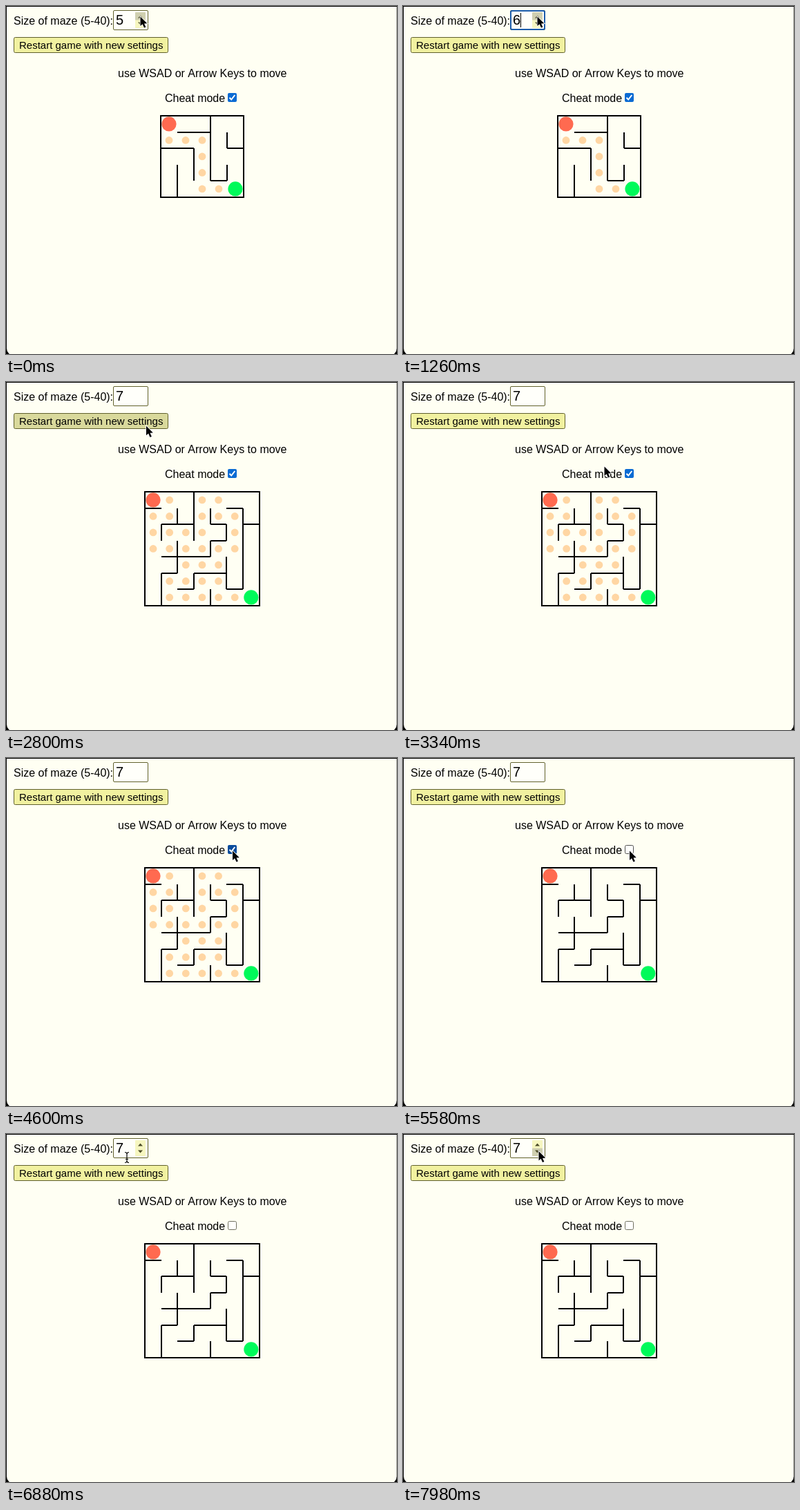
These frames come from a looping animation (566 by 504 pixels, 8000 ms). An HTML page with a canvas:

```html
<!DOCTYPE html>
<html lang="en">
<head>
<meta charset="utf-8">
<title>Maze</title>
<style>
html, body { margin: 0; width: 100%; height: 100%; overflow: hidden; background: #000; }
canvas { display: block; }
</style>
</head>
<body>
<canvas id="stage" width="566" height="504"></canvas>
<script>
const ctx = document.getElementById('stage').getContext('2d');
const LOOP = 8000;
const STEP_UPS = [1000, 1480];
const RESTART = 2560;
const UNCHECK = 5100;
const IVORY = '#fffff3';

// Pointer stops: time, x, y
const POINTER = [
  [0, 194, 15], [1620, 194, 15], [1900, 193, 57], [2700, 193, 57],
  [3220, 291, 122], [3440, 291, 122], [3940, 327.5, 134], [6280, 327.5, 134],
  [6860, 175, 34], [7280, 175, 34], [7640, 196, 24.5], [LOOP, 196, 24.5]
];

// Walls: h = row, from column, to column; v = column, from row, to row
const SMALL = {
  size: 5, x: 224, cell: 24,
  h: ['113', '202', '434', '245'],
  v: ['304', '224', '135', '434', '412'],
  dots: ['', '012', '2', '2', '23']
};
const LARGE = {
  size: 7, x: 201.2, cell: 23.64,
  h: ['101', '156', '213', '245', '345', '414', '512', '535', '623', '656', '267'],
  v: ['303', '212', '123', '412', '523', '434', '225', '235', '157', '356', '546', '616', '467']
    .filter(w => w !== '225'),
  dots: ['134', '01345', '01235', '012345', '234', '1234', '12345']
};

function pointerAt(t) {
  const i = POINTER.findIndex((p, k) => k > 0 && t <= p[0]);
  const [t0, x0, y0] = POINTER[i - 1], [t1, x1, y1] = POINTER[i];
  const u = (t - t0) / (t1 - t0), e = u * u * (3 - 2 * u);
  return { x: x0 + (x1 - x0) * e, y: y0 + (y1 - y0) * e };
}

const inside = (p, x, y, w, h) => p.x >= x && p.x <= x + w && p.y >= y && p.y <= y + h;

function text(str, x, y, size = 16) {
  ctx.font = size + 'px "Liberation Sans", Arial, sans-serif';
  ctx.fillStyle = '#000';
  ctx.fillText(str, x, y);
}

function box(x, y, w, h, r, fill, stroke, width = 1) {
  ctx.beginPath();
  ctx.roundRect(x, y, w, h, r);
  if (fill) { ctx.fillStyle = fill; ctx.fill(); }
  if (stroke) { ctx.strokeStyle = stroke; ctx.lineWidth = width; ctx.stroke(); }
}

function disc(x, y, r, fill) {
  ctx.beginPath();
  ctx.arc(x, y, r, 0, Math.PI * 2);
  ctx.fillStyle = fill;
  ctx.fill();
}

function poly(points, fill, stroke, width) {
  ctx.beginPath();
  points.forEach(([x, y]) => ctx.lineTo(x, y));
  ctx.closePath();
  if (stroke) { ctx.strokeStyle = stroke; ctx.lineWidth = width; ctx.stroke(); }
  ctx.fillStyle = fill;
  ctx.fill();
}

function drawSpinner(p) {
  box(187, 9, 15, 23, 1, '#f6f6c0');
  if (inside(p, 187, 9, 16, 23)) box(187, p.y < 20.5 ? 9 : 20.5, 15, 11.5, 1, '#cfcfb0');
  poly([[191, 17.5], [194.5, 13.5], [198, 17.5]], '#4c4c28');
  poly([[191, 23.5], [194.5, 27.5], [198, 23.5]], '#4c4c28');
}

function drawInput(t, p) {
  const lastStep = STEP_UPS.filter(s => t >= s).pop();
  const focused = lastStep !== undefined && t < RESTART;
  const hovered = inside(p, 155, 6, 51, 29);
  box(155.5, 6.5, 50, 28, 1.5, '#fffffa', '#62622e');
  if (focused) box(156, 7, 49, 27, 2, null, '#1c5cab', 2);
  if (focused || hovered) drawSpinner(p);
  text(5 + STEP_UPS.filter(s => t >= s).length, 159, 27, 20);
  if (focused && (t - lastStep) % 1000 < 500) {
    ctx.fillStyle = '#000';
    ctx.fillRect(170, 10, 1, 21);
  }
}

function drawCheckbox(t, p) {
  const hovered = inside(p, 321, 126, 13, 13);
  if (t >= UNCHECK) {
    box(321.5, 126.5, 12, 12, 2, '#fffffc', hovered ? '#4f4f4f' : '#707060');
    return;
  }
  box(321, 126, 13, 13, 2, hovered ? '#0a4c9c' : '#0b6bd3');
  ctx.beginPath();
  ctx.moveTo(323.5, 132.8);
  ctx.lineTo(326.2, 135.5);
  ctx.lineTo(331.3, 129);
  ctx.strokeStyle = '#fff';
  ctx.lineWidth = 2;
  ctx.stroke();
}

function drawMaze(maze, cheat) {
  const px = c => Math.round(maze.x + c * maze.cell);
  const py = r => Math.round(159 + r * 23.57);
  const cx = c => maze.x + (c + 0.5) * maze.cell;
  const cy = r => 159.2 + (r + 0.5) * 23.5;
  const last = maze.size - 1;

  if (cheat) maze.dots.forEach((row, r) => [...row].forEach(c => disc(cx(+c), cy(r), 5.4, '#ffd6a3')));
  disc(cx(0), cy(0), 10.6, '#ff6a50');
  disc(cx(last), cy(last), 10.6, '#00fa5a');

  ctx.strokeStyle = '#000';
  ctx.lineWidth = 2;
  ctx.beginPath();
  ctx.rect(px(0), 159, px(maze.size) - px(0), py(maze.size) - 159);
  for (const [r, a, b] of maze.h) {
    ctx.moveTo(px(+a), py(+r));
    ctx.lineTo(px(+b), py(+r));
  }
  for (const [c, a, b] of maze.v) {
    ctx.moveTo(px(+c), py(+a));
    ctx.lineTo(px(+c), py(+b));
  }
  ctx.stroke();
}

function drawPointer(p) {
  ctx.save();
  ctx.translate(p.x, p.y);
  if (inside(p, 155, 6, 32, 29)) {
    ctx.beginPath();
    ctx.moveTo(-3, -7.5);
    ctx.quadraticCurveTo(0, -7.5, 0, -5);
    ctx.quadraticCurveTo(0, -7.5, 3, -7.5);
    ctx.moveTo(0, -5);
    ctx.lineTo(0, 5);
    ctx.moveTo(-3, 7.5);
    ctx.quadraticCurveTo(0, 7.5, 0, 5);
    ctx.quadraticCurveTo(0, 7.5, 3, 7.5);
    ctx.moveTo(-2, 2.5);
    ctx.lineTo(2, 2.5);
    ctx.strokeStyle = '#000';
    ctx.lineWidth = 1.2;
    ctx.stroke();
  } else {
    poly([[0.5, 0.5], [0.5, 14], [3.6, 11.2], [6, 16.6], [8.4, 15.6], [6, 10.4], [10.3, 10.2]],
      '#000', '#fff', 1.6);
  }
  ctx.restore();
}

function draw(t) {
  const p = pointerAt(t);
  ctx.fillStyle = '#000';
  ctx.fillRect(0, 0, 566, 504);
  box(1, 1, 564.6, 505, [0, 0, 10, 10], IVORY);

  text('Size of maze (5-40):', 11, 27);
  drawInput(t, p);
  const hot = inside(p, 11, 45, 224, 23);
  box(11.5, 45.5, 223, 22, 2, hot ? '#d9d99c' : '#f1f1a0', '#5f5f2c');
  text('Restart game with new settings', 19, 62, 15);
  text('use WSAD or Arrow Keys to move', 162, 103);
  text('Cheat mode', 230, 139);
  drawCheckbox(t, p);
  drawMaze(t < RESTART ? SMALL : LARGE, t < UNCHECK);
  drawPointer(p);
}

let start;
function tick(now) {
  start ??= now;
  draw((now - start) % LOOP);
  requestAnimationFrame(tick);
}
draw(0);
requestAnimationFrame(tick);
</script>
</body>
</html>
```
